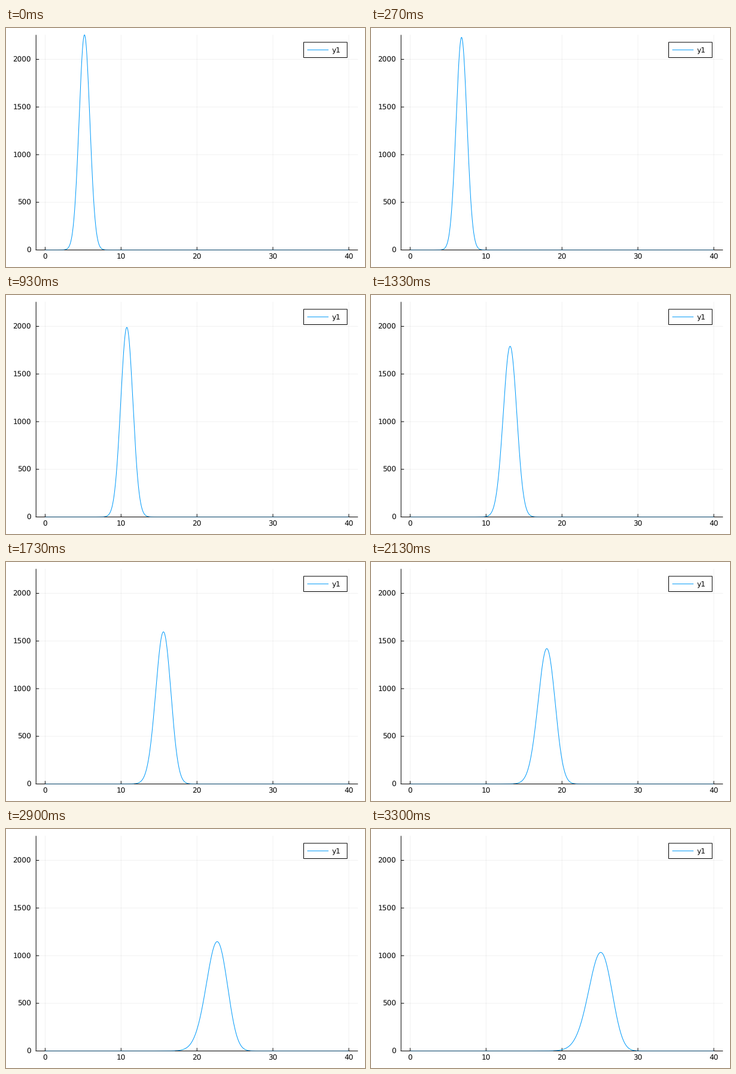
Animation of 600x400 px, one loop 3330 ms. Source, as a matplotlib script:

```python
import numpy as np
import matplotlib.pyplot as plt
from matplotlib.animation import FuncAnimation
from matplotlib.patches import Rectangle

W, H, DPI = 600, 400, 100
PT = 72 / DPI                       # points per pixel
LEFT, RIGHT, TOP, BASE = 50.2, 588.2, 11.5, 371.5
X_MIN, X_MAX = -1.2, 41.2
AREA = 4000
Y_MAX = AREA / np.sqrt(np.pi)
BLUE = "#009AFA"
TICKS, TICK_MS = 333, 10

plt.rcParams["font.family"] = "DejaVu Sans"
plt.rcParams["text.hinting"] = "no_hinting"
fig = plt.figure(figsize=(W / DPI, H / DPI), dpi=DPI, facecolor="white")
ax = fig.add_axes([0, 0, 1, 1])
ax.set_xlim(0, W)
ax.set_ylim(H, 0)
ax.axis("off")


def px(x):
    return LEFT + (x - X_MIN) / (X_MAX - X_MIN) * (RIGHT - LEFT)


def py(y):
    return BASE - y / Y_MAX * (BASE - TOP)


def stroke(xs, ys, color="black", **kw):
    line, = ax.plot(xs, ys, color=color, lw=PT, snap=False,
                    solid_capstyle="butt", **kw)
    return line


def label(x, y, text, ha):
    ax.text(x, y, text, ha=ha, va="baseline", fontsize=12 * PT,
            color="black", zorder=6)


def draw_axes():
    for x in range(0, 41, 10):
        gx = px(x)
        stroke([gx, gx], [TOP, BASE], alpha=0.055, zorder=1)
        stroke([gx, gx], [BASE - 5, BASE], zorder=2)
        label(gx, 387.3, str(x), "center")
    for y in range(0, 2001, 500):
        gy = py(y)
        stroke([LEFT, RIGHT], [gy, gy], alpha=0.055, zorder=1)
        stroke([LEFT, LEFT + 5], [gy, gy], zorder=2)
        label(42, gy + 4.4, str(y), "right")
    stroke([LEFT, LEFT], [TOP, BASE + 0.5], zorder=2)
    stroke([LEFT - 0.5, RIGHT], [BASE, BASE], zorder=2)


def draw_legend():
    ax.add_patch(Rectangle((497.5, 23.9), 72.7, 25.6, facecolor="white",
                           edgecolor="black", lw=PT, snap=False, zorder=5))
    stroke([503.5, 539], [36.7, 36.7], BLUE, zorder=6)
    label(545, 41.4, "y1", "left")


draw_axes()
draw_legend()

# the curve stays inside the plot; its flat ends tint the bottom axis
curve = stroke([], [], BLUE, zorder=4)
curve.set_clip_path(Rectangle((50, 11), 538, 360, transform=ax.transData))
floor = stroke([], [], BLUE, alpha=0.4, zorder=3)

u = np.linspace(-5, 5, 301)


def update(tick):
    """Spreading pulse whose trailing side slowly lengthens."""
    n = (3 * tick + 1) // 10        # 30 steps a second, held on 10 ms ticks
    center = 5.18 + 0.1985 * n + 2.8e-5 * n**2
    sigma = np.sqrt(0.5 + n**2 * (1.82e-4 + 1e-9 * n**2))
    skew = max(0, 0.0011 * (n - 25))
    height = AREA / (sigma * np.sqrt(2 * np.pi))

    def spread(v):
        return center + sigma * (v - skew * v**2 / 2)

    curve.set_data(px(spread(u)), py(height * np.exp(-u**2 / 2)))
    foot = np.sqrt(2 * np.log(height / 2))
    ends = np.array([0, spread(-foot), np.nan, spread(foot), 40])
    floor.set_data(px(ends), np.full(5, BASE))
    return curve, floor


anim = FuncAnimation(fig, update, frames=TICKS, interval=TICK_MS,
                     init_func=lambda: update(0), repeat=True,
                     repeat_delay=0, blit=False)
plt.show()
```
